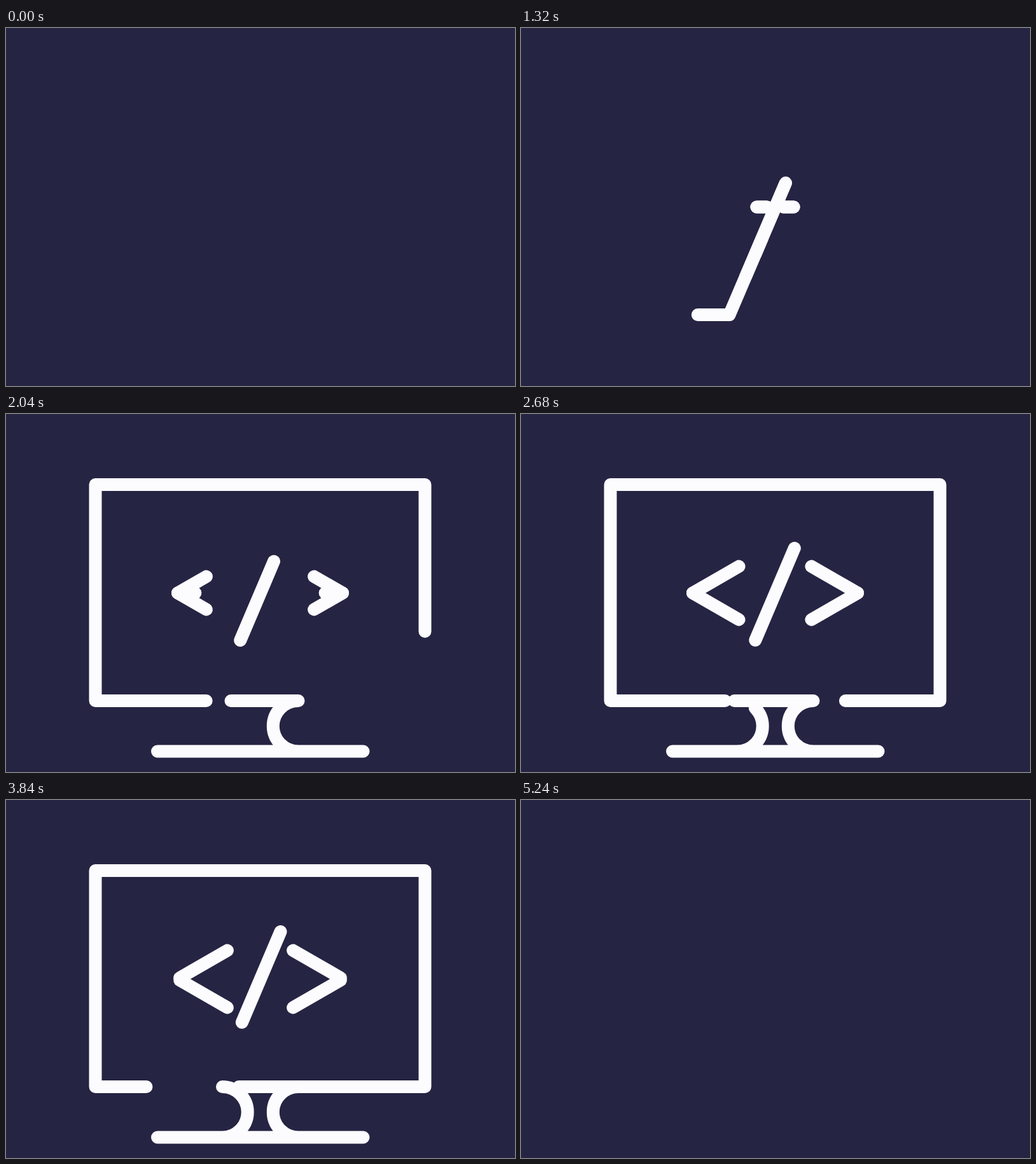
An HTML page for the animation above (6 s loop, 800 by 563 pixels).

```html
<!DOCTYPE html>
<html lang="en">
<head>
<meta charset="utf-8">
<title>Line-drawn monitor</title>
<style>
  html, body { margin: 0; height: 100%; overflow: hidden; background: #252443; }
  svg { display: block; width: 100%; height: 100%; }
  path { fill: none; stroke: #fcfbfd; stroke-width: 20; stroke-linecap: round; stroke-linejoin: round; }
</style>
</head>
<body>
<svg viewBox="0 0 800 563"></svg>
<script>
const LOOP = 6000, STEP = 40, OPEN = 1220, CLOSE = 5240;
const LEAD = 265; // length of the diagonal run that feeds the screen and the stand
const svg = document.querySelector('svg');
const clamp = x => Math.min(1, Math.max(0, x));
const strokes = [];

// span(s) returns the visible [start, end] along the path
function stroke(d, span) {
  const path = document.createElementNS('http://www.w3.org/2000/svg', 'path');
  path.setAttribute('d', d);
  svg.append(path);
  strokes.push({ path, span });
}

// The tail follows the diagonal, overshoots its resting place and settles back
function tail(s, overshoot, power) {
  const u = clamp(s.y / 0.7);
  return LEAD * u + overshoot * s.rest ** power * u * u;
}

// Streak entering from the right
const glide = t => 410 * (1 - (1 - clamp((t - 60) / 1180)) ** 4.1);
stroke('M809.5 281.5H390', s => s.t < 1240 ? [glide(s.t - 70), glide(s.t) + 0.1] : [0, 0]);

// Slash
stroke('M368.2 356L431.5 207', s => [162 * s.exit, 162 * s.enter]);

// Angle brackets, one path per arm
for (const side of [-1, 1]) for (const up of [-1, 1]) {
  const x = n => 399.5 + side * n;
  stroke(`M399.5 281.5H${x(129.5)}L${x(51.5)} ${281.5 + up * 45}`, s =>
    [129.5 * s.enter ** 1.3 + 90 * s.exit, 229.5 * s.enter - 10]);
}

// Screen
stroke('M431.5 207L327.5 451H140.5V111H658.5V451H459.5', s =>
  [tail(s, 177, 1.5) + 1584 * s.exit ** 0.85, 1849 * s.enter]);

// Stand
stroke('M431.5 207L327.5 451H459.5A39.75 39.75 0 0 0 459.5 530.5H561.5H238H340A39.75 39.75 0 0 0 340 451', s =>
  [tail(s, 100, 0.75) + 910 * s.exit, 1175 * s.enter]);

function draw(now) {
  const t = Math.floor(now % LOOP / STEP) * STEP;
  const y = Math.max(0, t - OPEN) / 1000;
  const x = Math.max(0, CLOSE - t) / 1000;
  const rest = 2 ** -(2.63 * y + 0.64 * y * y);
  const exit = 2 ** -(2.78 * x + 0.346 * x * x);
  const state = { t, y, rest, enter: 1 - rest, exit };
  for (const { path, span } of strokes) {
    const [start, end] = span(state);
    const from = Math.max(0, start);
    const visible = t > 40 && t < CLOSE && end > from;
    path.style.display = visible ? '' : 'none';
    path.style.strokeDasharray = `${Math.max(0.01, end - from)} 9999`;
    path.style.strokeDashoffset = -from;
  }
}

const began = performance.now();
function tick() {
  draw(performance.now() - began);
  requestAnimationFrame(tick);
}
tick();
</script>
</body>
</html>
```
